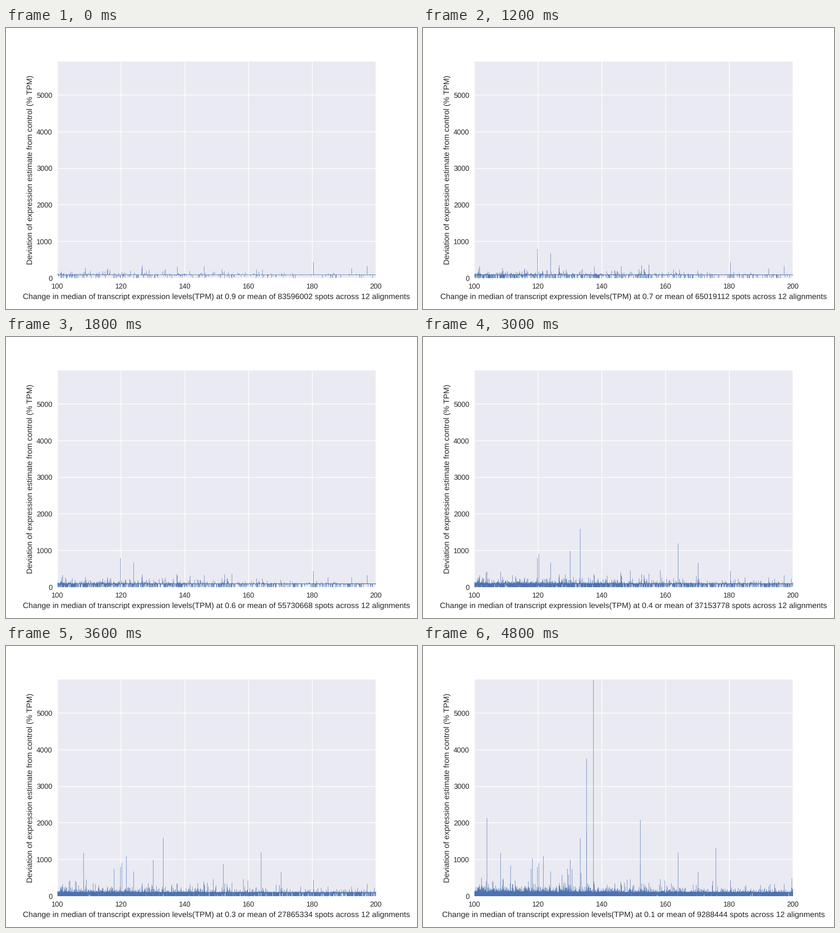
A matplotlib script for the animation above (5400 ms loop, 903 px wide and 620 px high).

```python
import matplotlib.pyplot as plt
import numpy as np
from matplotlib.animation import FuncAnimation
from matplotlib.collections import LineCollection

W, H, DPI = 903, 620, 64
PX = 72 / DPI                       # points per pixel
STEPS, STEP_MS = 9, 600
SPOTS = 92884447
BLUE, INK, PANEL = "#4C72B0", "#262626", "#EAEAF2"
TOP = 5911

# Tallest peaks: x, first step, height
PEAKS = [(133.2, 4, 1590), (163.9, 4, 1200), (130, 4, 1000), (120.2, 4, 910),
         (170.2, 4, 670), (108.1, 6, 1180), (121.6, 6, 1100), (152, 6, 880),
         (118.1, 7, 1040), (135.1, 7, 1820), (175.7, 7, 1320),
         (103.9, 8, 2140), (135.1, 8, 3760), (137.3, 8, TOP), (152, 8, 2085)]
peak_x, peak_step, peak_y = np.array(PEAKS).T

# Each point keeps its place, direction and size; it shows once the
# density at its x has grown past its rank.
rng = np.random.default_rng(7)
N = 24000
xs = rng.uniform(100, 200, N)
across = (xs - 100) / 100
rank = rng.random(N)
rises = rng.random(N) < 0.5
drop = rng.exponential(1, N)
rise = 40 * np.exp(-0.7 * across) * np.minimum(rng.pareto(2.2, N), 20)


def deviations(step):
    """Positions and end heights of all bars at a step."""
    t = step / (STEPS - 1)
    left, right = 2.2 * 13.6 ** t, 0.25 * 40 ** t      # bars per pixel
    on = rank < left * (right / left) ** across * 700 / N
    depth = 100 * np.minimum(1, drop * (0.5 + 0.3 * step))
    ys = np.where(rises, 100 + rise, 100 - depth)
    tall = peak_step <= step
    return np.append(xs[on], peak_x[tall]), np.append(ys[on], peak_y[tall])


plt.rcParams.update({"font.family": "Liberation Sans", "text.color": INK,
                     "text.hinting": "none"})
fig = plt.figure(figsize=(W / DPI, H / DPI), dpi=DPI, facecolor="white")
ax = fig.add_axes([0.125, 0.11, 0.775, 0.77], facecolor=PANEL)
ax.set(xlim=(100, 200), ylim=(0, TOP),
       xticks=range(100, 201, 20), yticks=range(0, 5001, 1000))
ax.set_axisbelow(True)
ax.grid(color="white", linewidth=1.57 * PX)
ax.tick_params(length=0, pad=11 * PX, labelsize=15.68 * PX, labelcolor=INK)
for spine in ax.spines.values():
    spine.set_visible(False)

label = dict(fontsize=17.25 * PX, ha="center", va="baseline",
             rotation_mode="anchor")
xlabel = fig.text(0.5125, 23 / H, "", **label)
fig.text(57 / W, 0.495, "Deviation of expression estimate from control (% TPM)",
         rotation=90, **label)

bars = LineCollection([], colors=BLUE, linewidths=0.78 * PX, snap=True)
ax.add_collection(bars, autolim=False)
base, = ax.plot([100, 200], [100, 100], color=BLUE)


def update(step):
    x, y = deviations(step)
    ends = np.column_stack([x, np.full_like(x, 100), x, y])
    bars.set_segments(ends.reshape(-1, 2, 2))
    base.set_linewidth((0.8 + 0.12 * step) * PX)
    tenths = STEPS - step
    xlabel.set_text(
        "Change in median of transcript expression levels(TPM) at "
        f"0.{tenths} or mean of {SPOTS * tenths // 10} spots "
        "across 12 alignments")
    return bars, base, xlabel


anim = FuncAnimation(fig, update, frames=STEPS, interval=STEP_MS,
                     init_func=lambda: update(0), repeat=True, repeat_delay=0)
plt.show()
```
